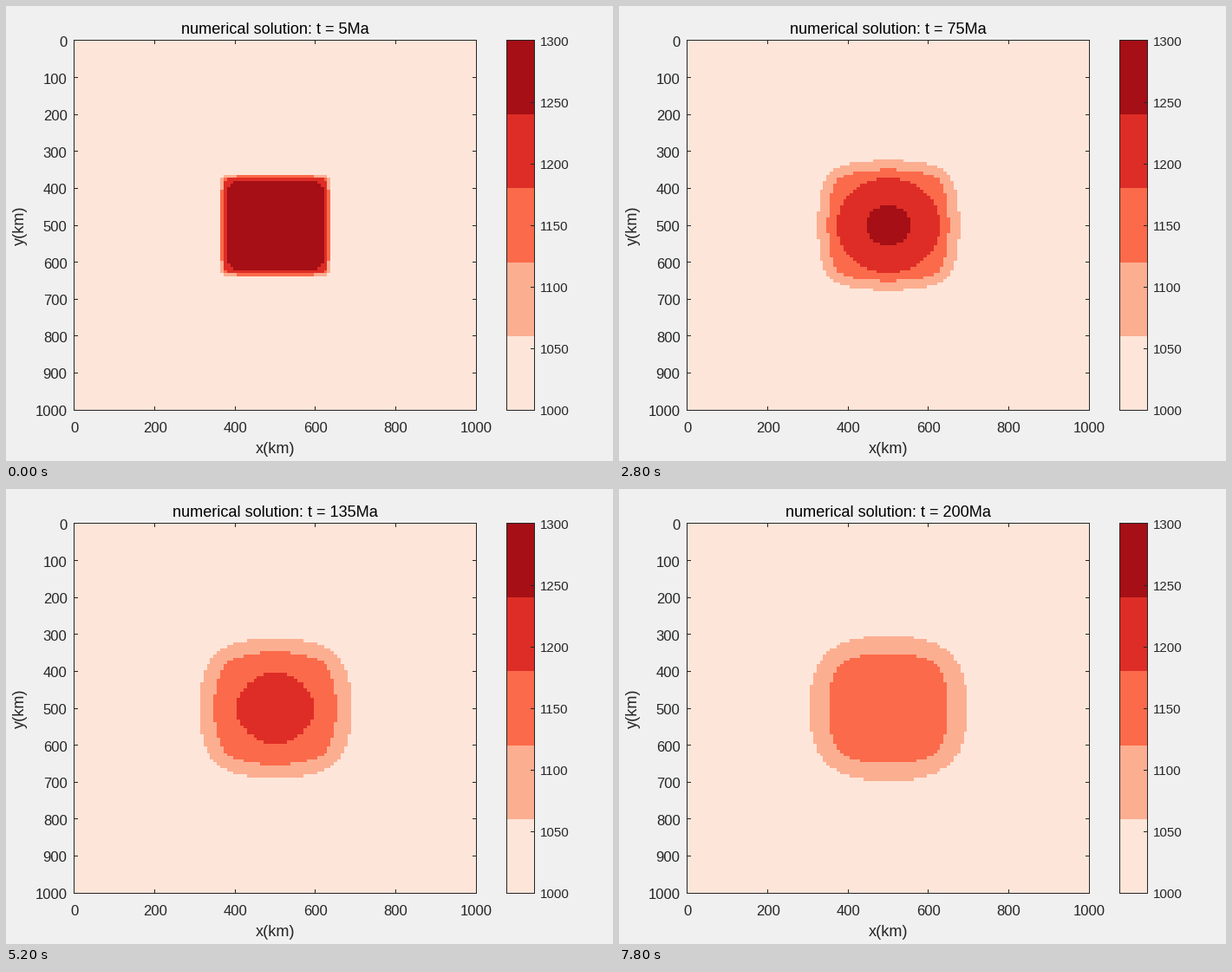
These frames come from a looping animation (700 px wide and 525 px high, 8000 ms). A matplotlib script:

```python
import numpy as np
import matplotlib.pyplot as plt
from matplotlib.animation import FuncAnimation
from matplotlib.colors import BoundaryNorm, ListedColormap
from matplotlib.patches import Rectangle

W, H, DPI = 700, 525, 100
FRAMES, INTERVAL = 40, 200
REDS = ["#fee5d9", "#fcae91", "#fb6a4a", "#de2d26", "#a50f15"]
INK = "#262626"

# Physical model: a hot, well conducting square in a cooler medium
N, HALF = 121, 15
FRAME_MA, SUBSTEPS = 5, 2
DT = FRAME_MA / SUBSTEPS * 1e6 * 365.25 * 86400
DX = 1e6 / (N - 1)
K_IN, K_OUT = 4.6, 1.5
HEAT_CAP_IN, HEAT_CAP_OUT = 3.30e6, 3.12e6
T_IN, T_OUT = 1300.0, 1000.0

# Plot area and colour bar in pixels: left, top, right, bottom
PLOT = (79, 40, 542, 466)
BAR = (578, 40, 609, 466)


def implicit_step(u, cap, gx, gy):
    """One backward Euler step, solved by conjugate gradients."""
    def operator(v):
        out = cap * v
        fx = gx * np.diff(v, axis=1)
        fy = gy * np.diff(v, axis=0)
        out[:, :-1] -= fx
        out[:, 1:] += fx
        out[:-1] -= fy
        out[1:] += fy
        return out

    x = u.copy()
    r = cap * u - operator(x)
    p = r.copy()
    rr = np.sum(r * r)
    for _ in range(300):
        if rr < 1e-14:
            break
        q = operator(p)
        a = rr / np.sum(p * q)
        x += a * p
        r -= a * q
        new = np.sum(r * r)
        p = r + new / rr * p
        rr = new
    return x


def harmonic(a, b):
    return 2 * a * b / (a + b)


def solve():
    d = np.abs(np.arange(N) - N // 2)
    inside = np.maximum(d[:, None], d[None, :]) <= HALF
    cap = np.where(inside, HEAT_CAP_IN / HEAT_CAP_OUT, 1.0)
    g = np.where(inside, K_IN, K_OUT) * DT / (HEAT_CAP_OUT * DX**2)
    gx = harmonic(g[:, 1:], g[:, :-1])
    gy = harmonic(g[1:], g[:-1])
    u = inside.astype(float)
    fields = []
    for _ in range(FRAMES):
        for _ in range(SUBSTEPS):
            u = implicit_step(u, cap, gx, gy)
        fields.append(T_OUT + (T_IN - T_OUT) * u)
    return fields


fields = solve()

plt.rcParams["font.family"] = "Liberation Sans"
fig = plt.figure(figsize=(W / DPI, H / DPI), dpi=DPI, facecolor="#f0f0f0")
ax = fig.add_axes([0, 0, 1, 1])
ax.axis("off")


def box(x, y, w, h, color, z=1):
    return ax.add_patch(Rectangle((x, y), w, h, fc=color, lw=0,
                                  antialiased=False, zorder=z))


def outline(left, top, right, bottom):
    w, h = right - left + 2, bottom - top + 2
    for y in (top - 1, bottom):
        box(left - 1, y, w, 1, INK, 3)
    for x in (left - 1, right):
        box(x, top - 1, 1, h, INK, 3)


def label(x, y, text, px, ha="center", color=INK, **kw):
    return ax.text(x, y, text, fontsize=px * 72 / DPI, ha=ha, va="baseline",
                   color=color, **kw)


# Nodes 0 and N-1 lie on the frame, so the outer cells are cut in half
left, top, right, bottom = PLOT
cw, ch = (right - left) / (N - 1), (bottom - top) / (N - 1)
x0, y0 = left + 0.2 - cw / 2, top + 0.1 - ch / 2
image = ax.imshow(fields[0], cmap=ListedColormap(REDS),
                  norm=BoundaryNorm(np.linspace(T_OUT, T_IN, 6), 5, clip=True),
                  extent=(x0, x0 + N * cw, y0 + N * ch, y0),
                  interpolation="nearest", aspect="auto", zorder=2)
image.set_clip_path(box(left, top, right - left, bottom - top, REDS[0]))
outline(*PLOT)

for km in range(0, 1001, 200):
    x = left + (right - left) * km / 1000
    if 0 < km < 1000:
        box(int(x), top, 1, 4, INK, 3)
        box(int(x), bottom - 4, 1, 4, INK, 3)
    label(x, 491.5, str(km), 16.67)

for km in range(0, 1001, 100):
    y = top + (bottom - top) * km / 1000
    if 0 < km < 1000:
        box(left, int(y), 4, 1, INK, 3)
        box(right - 4, int(y), 4, 1, INK, 3)
    label(70.5, y + 7, str(km), 16.67, "right")

label(310.5, 516, "x(km)", 18.2)
label(24.5, 253, "y(km)", 18.2, rotation=90).set(ha="right", va="center")
title = label(310.5, 32, "", 18.2, color="black")

bl, bt, br, bb = BAR
band = (bb - bt) / len(REDS)
for i, color in enumerate(REDS):
    y0, y1 = round(bb - (i + 1) * band), round(bb - i * band)
    box(bl, y0, br - bl, y1 - y0, color)
outline(*BAR)
for i in range(7):
    y = bb - i * (bb - bt) / 6
    if 0 < i < 6:
        box(br - 4, int(y), 4, 1, INK, 3)
    label(616, y + 6, str(1000 + 50 * i), 15, "left")

ax.set_xlim(0, W)
ax.set_ylim(H, 0)
ax.set_aspect("auto")


def draw(i):
    image.set_data(fields[i])
    title.set_text(f"numerical solution: t = {FRAME_MA * (i + 1)}Ma")
    return image, title


anim = FuncAnimation(fig, draw, frames=FRAMES, interval=INTERVAL,
                     repeat=True, repeat_delay=0)
plt.show()
```
